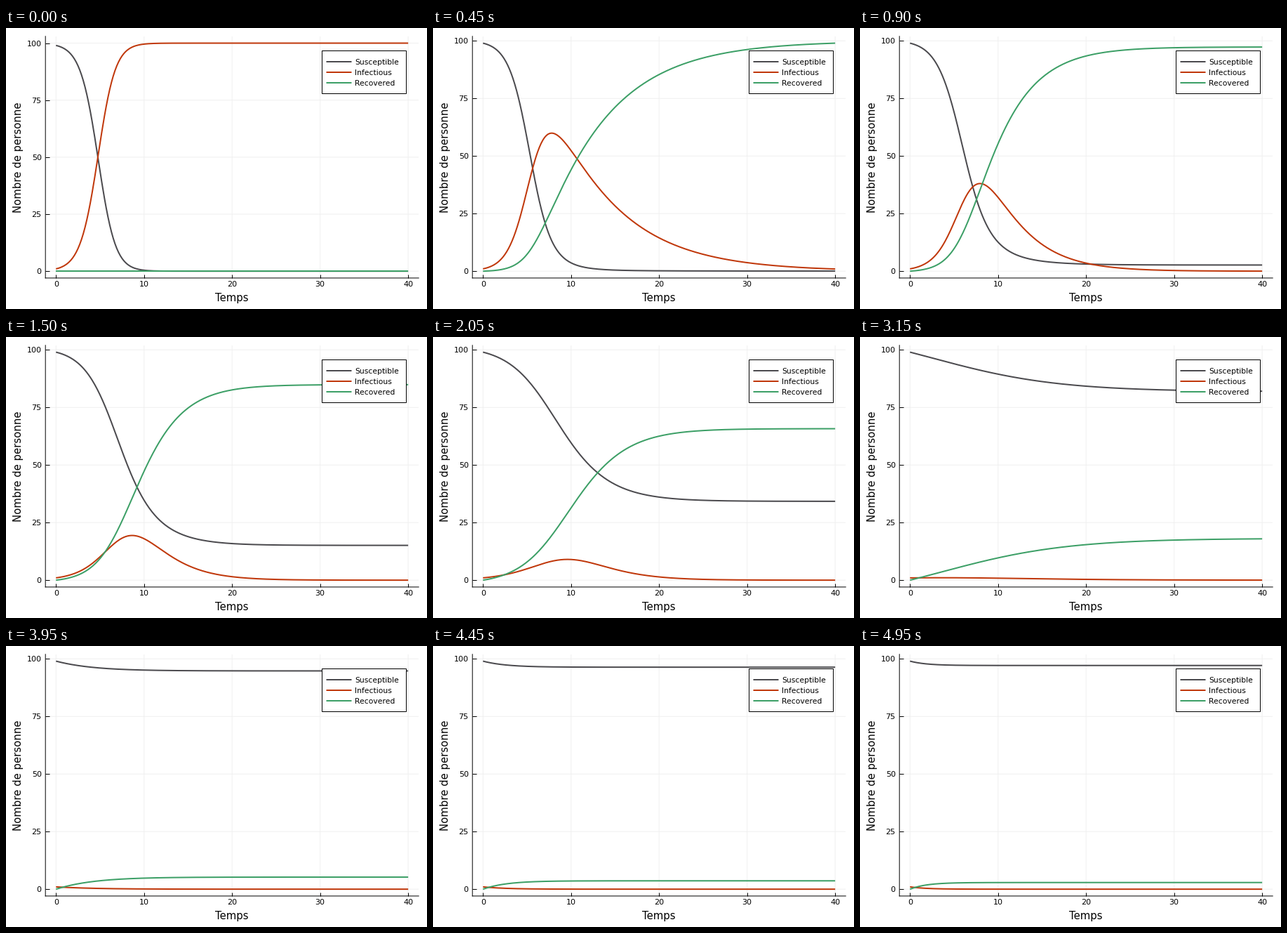
Recreate the animation shown at these times as a matplotlib script. Size 600x400 px, loop 5 s.

```python
import numpy as np
import matplotlib.pyplot as plt
from matplotlib.animation import FuncAnimation
from matplotlib.patches import Rectangle

W, H, DPI = 600, 400, 100
PX = 72 / DPI  # points per pixel
FRAMES, INTERVAL = 100, 50
LEFT, RIGHT, TOP, BOTTOM = 56.2, 588.2, 11.8, 355.9

N, BETA, DT, T_MAX = 100, 1.0, 0.1, 40
GAMMA_MAX = 1.5
STEPS = round(T_MAX / DT)
TIMES = np.linspace(0, T_MAX, STEPS + 1)
SERIES = [
    ("Susceptible", "#4b4a4e"),
    ("Infectious", "#c0370a"),
    ("Recovered", "#3c9f66"),
]

plt.rcParams["font.family"] = "DejaVu Sans"


def simulate(gamma):
    """Euler steps of the SIR model; one row each for S, I and R."""
    out = np.empty((3, STEPS + 1))
    s, i, r = N - 1.0, 1.0, 0.0
    out[:, 0] = s, i, r
    for k in range(1, STEPS + 1):
        infected = BETA * s * i / N * DT
        recovered = gamma * i * DT
        s, i, r = s - infected, i + infected - recovered, r + recovered
        out[:, k] = s, i, r
    return out


def widened(low, high, share=0.03):
    pad = share * (high - low)
    return low - pad, high + pad


fig = plt.figure(figsize=(W / DPI, H / DPI), dpi=DPI, facecolor="white")

ax = fig.add_axes([LEFT / W, 1 - BOTTOM / H, (RIGHT - LEFT) / W, (BOTTOM - TOP) / H])
ax.set_xlim(*widened(0, T_MAX))
ax.set_xticks(range(0, 41, 10))
ax.set_yticks(range(0, 101, 25))
ax.set_axisbelow(True)
ax.grid(color="#f0f0f0", linewidth=PX, snap=False)
ax.tick_params(direction="in", length=5.5 * PX, width=PX, labelsize=11.1 * PX)
ax.tick_params(axis="x", pad=4.4 * PX)
ax.tick_params(axis="y", pad=5.5 * PX)
for side, spine in ax.spines.items():
    spine.set_visible(side in ("left", "bottom"))
    spine.set_linewidth(PX)
    spine.set_snap(False)

curves = [
    ax.plot([], [], color=color, lw=2 * PX, solid_capstyle="butt")[0]
    for _, color in SERIES
]

# Overlay in pixel coordinates for the axis titles and the legend
over = fig.add_axes([0, 0, 1, 1], zorder=2)
over.set_xlim(0, W)
over.set_ylim(H, 0)
over.axis("off")
over.text(321.8, 389, "Temps", size=14.9 * PX, ha="center", va="baseline")
over.text(22, 184, "Nombre de personne", size=14.9 * PX, rotation=90,
          rotation_mode="anchor", ha="center", va="baseline")
over.add_patch(Rectangle((450.5, 32.5), 120, 61, facecolor="white",
                         edgecolor="black", linewidth=PX, snap=False))
for row, (name, color) in enumerate(SERIES):
    y = 48 + 15 * row
    over.plot([456.5, 492.5], [y, y], color=color, lw=2 * PX,
              solid_capstyle="butt", snap=False)
    over.text(497.3, y + 4, name, size=10.7 * PX, va="baseline")


def draw(frame):
    values = simulate(GAMMA_MAX * frame / (FRAMES - 1))
    for curve, row in zip(curves, values):
        curve.set_data(TIMES, row)
    ax.set_ylim(*widened(values.min(), values.max()))
    return curves


anim = FuncAnimation(fig, draw, frames=FRAMES, interval=INTERVAL,
                     repeat=True, repeat_delay=0)
plt.show()
```
